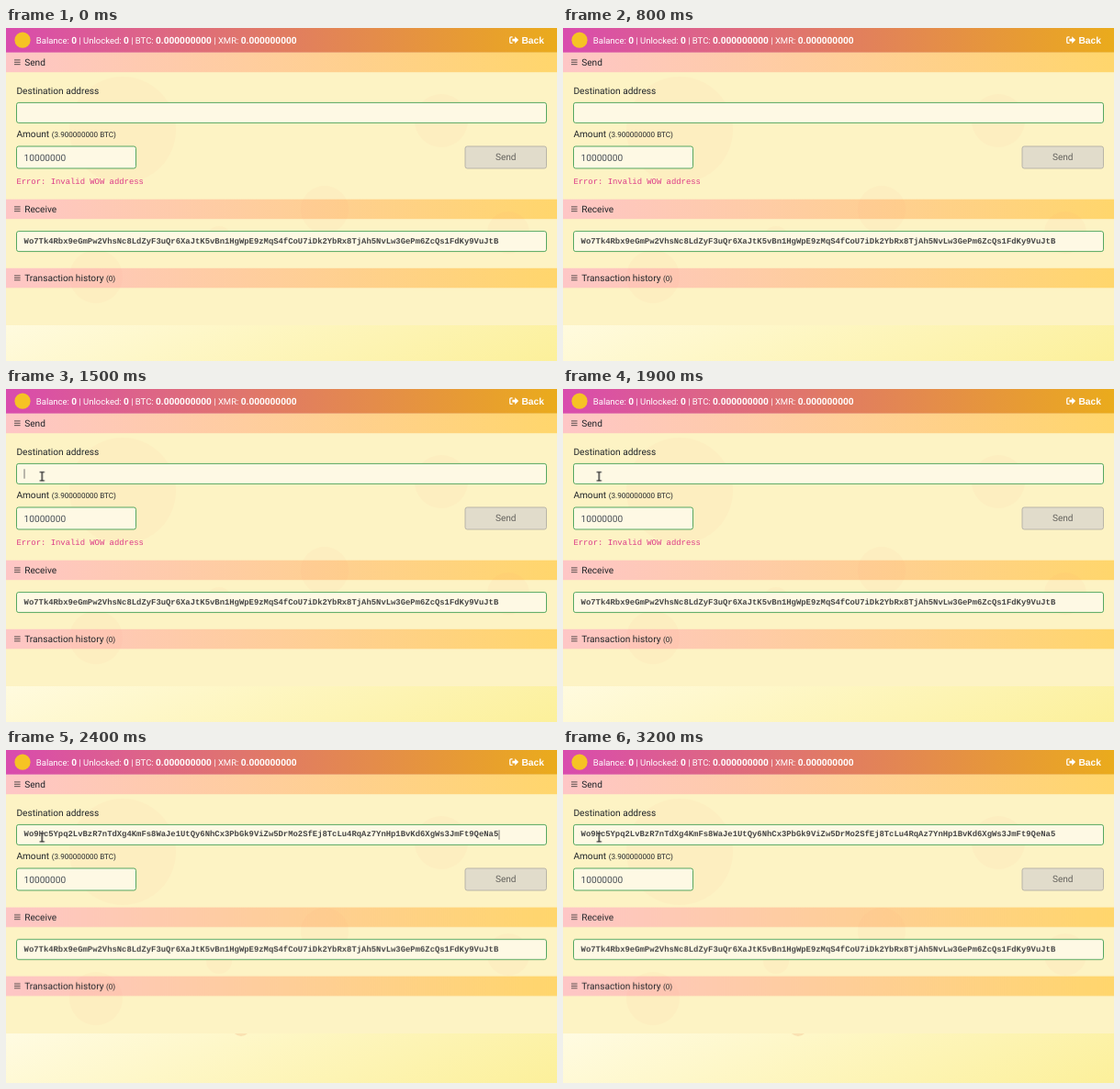
Write an HTML page that moves like this. It is 600x363 px and loops after 3300 ms.

```html
<!DOCTYPE html>
<html lang="en">
<head>
<meta charset="utf-8">
<title>Wallet</title>
<style>
html, body { margin: 0; width: 100%; height: 100%; overflow: hidden; background: #fdf3c4; }
svg { display: block; width: 100vw; height: 100vh; }
text { font: 10.15px Roboto, sans-serif; fill: #212529; white-space: pre; text-rendering: geometricPrecision; }
.small { font-size: 8.12px; }
.mono { font: 8.88px "Liberation Mono", monospace; }
.address { font-weight: 700; fill: #454545; }
.error { fill: #dc3a88; }
.value { fill: #495057; }
.status { font-size: 9.5px; fill: #fff; }
.status tspan { font-size: 10.1px; font-weight: 700; }
.back { font: 700 10.3px "Liberation Sans", sans-serif; fill: #fff; }
.field { fill: #fef9e4; stroke: #2a9444; stroke-width: .8; }
.marks circle { fill: #f58a70; opacity: .045; }

.lower, .error, .pasted, .caret, .caret-end, .arrow, .beam { animation: 3.3s step-end infinite; }
.lower { animation-name: lift; }
.error { animation-name: clear; }
.pasted { animation-name: paste; }
.caret { animation-name: blink; }
.caret-end { animation-name: blink-end; }
.arrow { animation-name: arrow; }
.beam { animation-name: beam; }
@keyframes lift { 0% { transform: none; } 72.7%, 100% { transform: translateY(-15.2px); } }
@keyframes clear { 0% { opacity: 1; } 72.7%, 100% { opacity: 0; } }
@keyframes paste { 0% { opacity: 0; } 72.7%, 100% { opacity: 1; } }
@keyframes blink { 0% { opacity: 0; } 42.4% { opacity: 1; } 57.55%, 100% { opacity: 0; } }
@keyframes blink-end { 0% { opacity: 0; } 72.7% { opacity: 1; } 87.85%, 100% { opacity: 0; } }
@keyframes arrow {
  0% { opacity: 0; transform: translate(-12px, 116px); }
  27.25% { opacity: 1; transform: translate(2px, 112px); }
  30.28% { opacity: 1; transform: translate(13px, 107px); }
  33.3% { opacity: 1; transform: translate(23px, 101px); }
  36.34%, 100% { opacity: 0; transform: translate(23px, 101px); }
}
@keyframes beam {
  0% { opacity: 0; transform: translate(33px, 97px); }
  36.34% { opacity: 1; transform: translate(33px, 97px); }
  39.37%, 100% { opacity: 1; transform: translate(39.3px, 95.3px); }
}
</style>
</head>
<body>
<svg viewBox="0 0 600 363" preserveAspectRatio="none">
  <defs>
    <linearGradient id="top">
      <stop stop-color="#d94bae"/><stop offset=".5" stop-color="#e17c62"/><stop offset="1" stop-color="#eaab1c"/>
    </linearGradient>
    <linearGradient id="bar">
      <stop stop-color="#fec6c6"/><stop offset="1" stop-color="#ffd66c"/>
    </linearGradient>
    <linearGradient id="page" gradientUnits="userSpaceOnUse" x1="0" y1="309" x2="107" y2="568">
      <stop stop-color="#fffbe2"/><stop offset="1" stop-color="#fcf09a"/>
    </linearGradient>
    <g id="menu">
      <rect width="600" height="21.5" fill="url(#bar)"/>
      <path d="M9 8.2h6.6M9 10.6h6.6M9 13h6.6" stroke="#45403f" stroke-width=".9"/>
    </g>
  </defs>

  <rect width="600" height="363" fill="url(#page)"/>
  <circle cx="256" cy="302" r="10" fill="#f0a070" opacity=".25"/>

  <!-- panel backgrounds -->
  <rect y="27" width="600" height="160" fill="#fdf3c4"/>
  <use href="#menu" y="26.7"/>
  <g class="lower">
    <rect y="186.7" width="600" height="137.3" fill="#fdf3c4"/>
    <use href="#menu" y="186.7"/>
    <use href="#menu" y="261.8"/>
  </g>
  <g class="marks">
    <circle cx="127" cy="111" r="58"/>
    <circle cx="474" cy="101" r="29"/>
    <circle cx="347" cy="198" r="26"/>
    <circle cx="547" cy="223" r="23"/>
    <circle cx="98" cy="271" r="29"/>
    <circle cx="232" cy="230" r="14"/>
  </g>

  <!-- top bar -->
  <rect width="600" height="26.7" fill="url(#top)"/>
  <circle cx="18" cy="13.2" r="8.6" fill="#f6c324"/>
  <text class="status" x="32.8" y="16.5">Balance: <tspan>0</tspan> | Unlocked: <tspan>0</tspan> | BTC: <tspan>0.000000000</tspan> | XMR: <tspan>0.000000000</tspan></text>
  <path d="M551.6 9.8h-1.6q-1.2 0-1.2 1.2v4.2q0 1.2 1.2 1.2h1.6" fill="none" stroke="#fff" stroke-width="1.3"/>
  <path d="M551.3 11.7h2.9V9.2l3.9 3.9-3.9 3.9v-2.5h-2.9z" fill="#fff"/>
  <text class="back" x="561.4" y="16.5">Back</text>

  <!-- send -->
  <text x="20.2" y="40.8">Send</text>
  <text x="11.4" y="71.5">Destination address</text>
  <rect class="field" x="11.5" y="81.4" width="577" height="22" rx="2.3"/>
  <text class="mono address pasted" x="19.6" y="94.4">Wo9Hc5Ypq2LvBzR7nTdXg4KmFs8WaJe1UtQy6NhCx3PbGk9ViZw5DrMo2SfEj8TcLu4RqAz7YnHp1BvKd6XgWs3JmFt9QeNa5</text>
  <path class="caret" d="M20 87.3v10.4" stroke="#555" stroke-width=".8"/>
  <path class="caret-end" d="M537 87.3v10.4" stroke="#555" stroke-width=".8"/>
  <text x="11.4" y="119.1">Amount <tspan class="small">(3.900000000 BTC)</tspan></text>
  <rect class="field" x="11.5" y="129" width="130" height="24" rx="2.3"/>
  <text class="value" x="19.6" y="144.5">10000000</text>
  <rect x="500" y="129" width="88.5" height="24" rx="2.3" fill="#e1dccb" stroke="#b3afa5" stroke-width=".9"/>
  <text x="532.9" y="144.2" style="fill:#66645f">Send</text>
  <text class="mono error" x="11.4" y="169.5">Error: Invalid WOW address</text>

  <!-- receive and history -->
  <g class="lower">
    <text x="20.2" y="201.2">Receive</text>
    <rect class="field" x="11.5" y="221.6" width="577" height="22" rx="2.3"/>
    <text class="mono address" x="19.6" y="234.8">Wo7Tk4Rbx9eGmPw2VhsNc8LdZyF3uQr6XaJtK5vBn1HgWpE9zMqS4fCoU7iDk2YbRx8TjAh5NvLw3GePm6ZcQs1FdKy9VuJtB</text>
    <text x="20.2" y="276.2">Transaction history <tspan class="small">(0)</tspan></text>
  </g>

  <!-- pointer -->
  <path class="arrow" d="M0 0V10.8L2.6 8.4 4.5 12.8 6.4 12 4.5 7.7H8z" fill="#fff8e4" stroke="#26221c" stroke-width="1.1"/>
  <g class="beam" fill="none">
    <path d="M-2.6-4.6H2.6M0-4.6V4.6M-2.6 4.6H2.6" stroke="#fff" stroke-width="2.6" opacity=".6"/>
    <path d="M-2.6-4.6H2.6M0-4.6V4.6M-2.6 4.6H2.6" stroke="#2c2a25" stroke-width="1.4"/>
  </g>
</svg>
</body>
</html>
```
